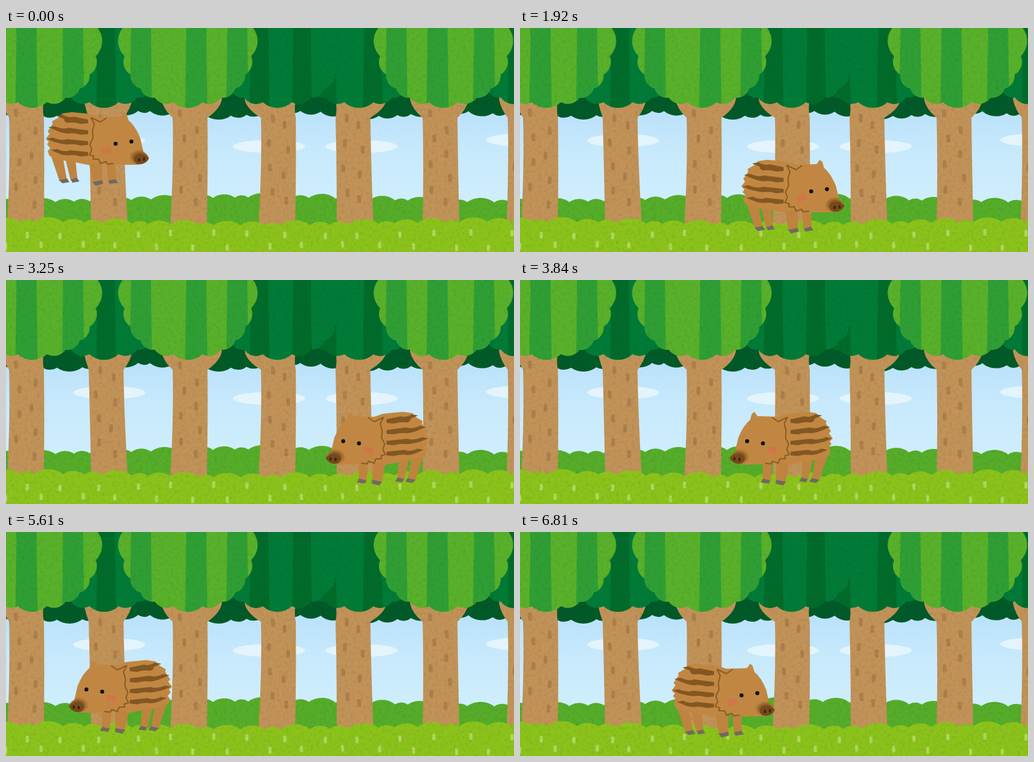
An HTML page for the animation above (8600 ms loop, 817x362 px).

```html
<!DOCTYPE html>
<html lang="en">
<head>
<meta charset="utf-8">
<title>Boar in the forest</title>
<style>
  html, body { margin: 0; width: 100%; height: 100%; overflow: hidden; background: #c8eafc; }
  svg { position: absolute; left: 0; top: 0; overflow: visible; }
  #boar { will-change: transform; transform-origin: 147px 0; }
</style>
</head>
<body>
<svg id="forest" width="817" height="362"></svg>
<svg id="boar" width="294" height="270">
  <defs>
    <radialGradient id="muzzle">
      <stop offset=".3" stop-color="#714818"/>
      <stop offset="1" stop-color="#714818" stop-opacity="0"/>
    </radialGradient>
    <clipPath id="head"><path d="M160 145L196 149Q208 160 216 179L221 200Q232 207 229 213Q224 221 210 221L160 219Z"/></clipPath>
  </defs>
  <path fill="#bf8340" d="M70 200L86 247L98 246L91 206ZM94 206L104 246L115 245L111 206ZM161 215L164 247L177 247L176 215ZM132 210L140 250L155 249L155 212Z"/>
  <path fill="#706960" d="M85 246L98 243L102 249L91 251ZM104 245L114 242L118 248L107 250ZM139 249L155 246L156 252L144 255ZM164 247L176 244L180 250L167 252Z"/>
  <path fill="#c18742" d="M64 179L70 171L67 167L75 155L74 151L84 145L91 138L106 136L137 139L152 144L185 143L190 136L194 139L197 149Q208 158 216 178L221 200Q231 206 229 212Q225 220 211 221L172 221L140 217L136 222L116 218L92 214L70 207L67 199L71 194L66 188L69 184Z"/>
  <g id="coat" fill="#835722"></g>
  <path fill="none" stroke="#8a5c25" stroke-width="2" stroke-linejoin="round" d="M162 145L152 152L137 145L142 155L139 167L140 178L135 188L138 197L134 205L141 207L140 212L149 212L152 219L161 216L163 220L173 219"/>
  <path fill="#d4704b" opacity=".75" d="M154 194L168 192L169 202L162 201L160 205L154 203Z"/>
  <ellipse cx="215" cy="209" rx="17" ry="13" fill="url(#muzzle)" clip-path="url(#head)"/>
  <path fill="#75491c" d="M205 211Q209 204 222 204L230 210Q227 218 217 220Q207 221 205 211Z"/>
  <g fill="#3c230c"><ellipse cx="214" cy="213" rx="1.8" ry="3"/><ellipse cx="222" cy="212" rx="1.6" ry="3"/></g>
  <g fill="#14100c"><circle cx="176.3" cy="187" r="3.2"/><circle cx="201.7" cy="183.5" r="3.2"/></g>
</svg>
<script>
const { sin, cos, PI, floor, round, min, max, hypot, sign } = Math;
const WIDTH = 817, STEP = 147.6, LOOP = 8600, GROUND = 77;

const range = (count, make) => Array.from({ length: count }, (_, i) => make(i));
const path = (d, fill) => `<path d="${d}" fill="${fill}"/>`;

// Outline of round lobes through the points, bulging to the left of travel.
function lobes(points, roundness) {
  return points.map(([x, y], i) => {
    if (!i) return `M${x} ${y}`;
    const r = roundness * hypot(x - points[i - 1][0], y - points[i - 1][1]);
    return `A${r} ${r} 0 0 1 ${x} ${y}`;
  }).join('');
}

// Scalloped edge across the stage; a negative gap runs leftwards and bulges down.
function ridge(gap, level, fill, close) {
  const first = gap > 0 ? -20 : WIDTH + 20;
  const points = range(30, i => {
    const x = first + gap * (i + 0.2 * sin(i * 2.3));
    return [x, level(x)];
  });
  return path(lobes(points, 0.85) + `V${close}H${first}Z`, fill);
}

// Rounded treetop with vertical dark stripes.
const CROWN_X = 292.5, LOBES = 11;
const crownShape = lobes(range(LOBES + 1, i => {
  const a = PI * i / LOBES, c = cos(a);
  return [CROWN_X + 105 * sign(c) * Math.abs(c) ** 0.77, 121 * sin(a) ** 0.77];
}), 0.75) + 'V-20H397Z';

function crown(dx, light, dark, width, starts) {
  const stripes = starts.map(x => path(`M${x + 2} 0h${width - 4}L${x + width} 140h${-width}Z`, dark)).join('');
  return `<g transform="translate(${dx})"><g clip-path="url(#crown)">
    <rect x="170" y="-5" width="250" height="145" fill="${light}"/>${stripes}</g></g>`;
}
const nearCrown = (dx, starts) => crown(dx, '#58b12b', '#2f9f35', 36, starts);
const farCrown = (dx, starts) => crown(dx, '#007b38', '#006c2b', 32, starts);

// Trunk with branches flaring out under the leaves.
function trunk(x, lean, flareLeft, flareRight) {
  const right = x + 56, foot = x + lean;
  const body = `M${x - flareLeft} 105V116Q${x - flareLeft + 3} 131 ${x} 145Q${x + 2} 220 ${foot} 322
    H${foot + 59}Q${right + 1} 220 ${right} 145Q${right + flareRight - 3} 131 ${right + flareRight} 116V105Z`;
  const marks = range(8, i => `<rect x="${x + 12 + 25 * (i % 2) + 4 * sin(i * 2 + x)}"
    y="${135 + 20 * i + 5 * sin(i * 3 + x)}" width="6" height="13" rx="2.5" fill="#ad7f4a"/>`);
  return path(body, '#c19359') + marks.join('');
}

const cloud = (x, y) => `<ellipse cx="${x}" cy="${y}" rx="58" ry="10.5" fill="#e3f4fd"/>`;
const blades = range(28, i => `<rect x="${30 * i - 3 + 5 * sin(i * 1.9)}" y="${(i % 2 ? 328 : 347) + 3 * sin(i * 2.7)}"
  width="5" height="11" rx="2.5" fill="#b4d75c"/>`).join('');
const wave = x => cos(2 * PI * x / WIDTH);

document.getElementById('forest').innerHTML = `
  <defs>
    <linearGradient id="sky" x2="0" y2="1">
      <stop offset=".36" stop-color="#b9e1fb"/><stop offset=".55" stop-color="#c7e9fc"/><stop offset=".78" stop-color="#cfeefd"/>
    </linearGradient>
    <clipPath id="crown"><path d="${crownShape}"/></clipPath>
    <filter id="grain" x="0" y="0" width="817" height="362" filterUnits="userSpaceOnUse" color-interpolation-filters="sRGB">
      <feTurbulence type="fractalNoise" baseFrequency=".2" numOctaves="2" seed="4"/>
      <feColorMatrix values="0 0 0 0 .2  0 0 0 0 .15  0 0 0 0 0  .22 0 0 0 -.1"/>
      <feComposite operator="in" in2="SourceGraphic" result="specks"/>
      <feMerge><feMergeNode in="SourceGraphic"/><feMergeNode in="specks"/></feMerge>
    </filter>
  </defs>
  <rect width="817" height="362" fill="url(#sky)"/>
  ${cloud(166, 182) + cloud(423, 191.5) + cloud(572, 191.5) + cloud(830, 181)}
  <g filter="url(#grain)">
    ${ridge(-30, x => 138 + 4 * cos((x - 95) / 40), '#005a29', -20)}
    ${ridge(32, x => 278 + 4 * wave(x), '#55ad2a', 370)}
    ${trunk(133, 4, 8, 14) + trunk(410, -4, 26, 0) + trunk(530, 2, 0, 26) + trunk(807, -2, 14, 0)}
    ${farCrown(-135, [280]) + farCrown(557, [250]) + farCrown(275, [225, 299]) + farCrown(144, [248, 316])}
    ${trunk(5, -3, 12, 0) + trunk(268, -4, 18, 23) + trunk(670, 0, 20, 18)}
    ${nearCrown(-250, [199, 265, 340]) + nearCrown(0, [199, 288, 354]) + nearCrown(411, [199, 265, 340])}
    ${ridge(36, x => 316 - 3 * wave(x), '#8bc31c', 370)}
    ${blades}
  </g>`;

// Wavy coat stripes, pointed towards the tail.
document.getElementById('coat').innerHTML = range(4, i => {
  const x = 65 + 5 * (i - 1.8) ** 2, y = 142 + 18.5 * i, drop = 8 - i, length = 132 - x;
  return `<path d="M${x} ${y}l10 -2q${length * 0.2} 6 ${length * 0.35} ${drop * 0.4}L132 ${y + drop - 2}v6
    l-12 1q-10 -3 -18 -2T${x + 12} ${y + 5}Z"/>`;
}).join('');

// Runs as [first step, last step, pixels per step]; jumps by their first step.
const runs = [[1, 13.7, 24.3], [13.7, 18.15, 56], [20.1, 25.1, -57], [33.87, 38.92, -57], [40.43, 43.9, 56.2]];
const jumps = [13.15, 30.85, 37.8], HALF = 3.3, HEIGHT = 54.5;

const travel = n => runs.reduce((x, [from, to, speed]) => x + speed * max(0, min(n, to) - from), 0);
const height = n => max(0, GROUND - 5 * n * n,
  ...jumps.map(from => HEIGHT * (1 - ((n - from) / HALF - 1) ** 2)));

const boar = document.getElementById('boar');
function draw(time) {
  const n = floor((time % LOOP) / STEP + 0.01);
  const flip = n > 20.1 && n < 40.43 ? -1 : 1;
  boar.style.transform = `translate(${round(travel(n))}px, ${round(GROUND - height(n))}px) scaleX(${flip})`;
}

let start;
function tick(now) {
  start ??= now;
  draw(now - start);
  requestAnimationFrame(tick);
}
draw(0);
requestAnimationFrame(tick);
</script>
</body>
</html>
```
